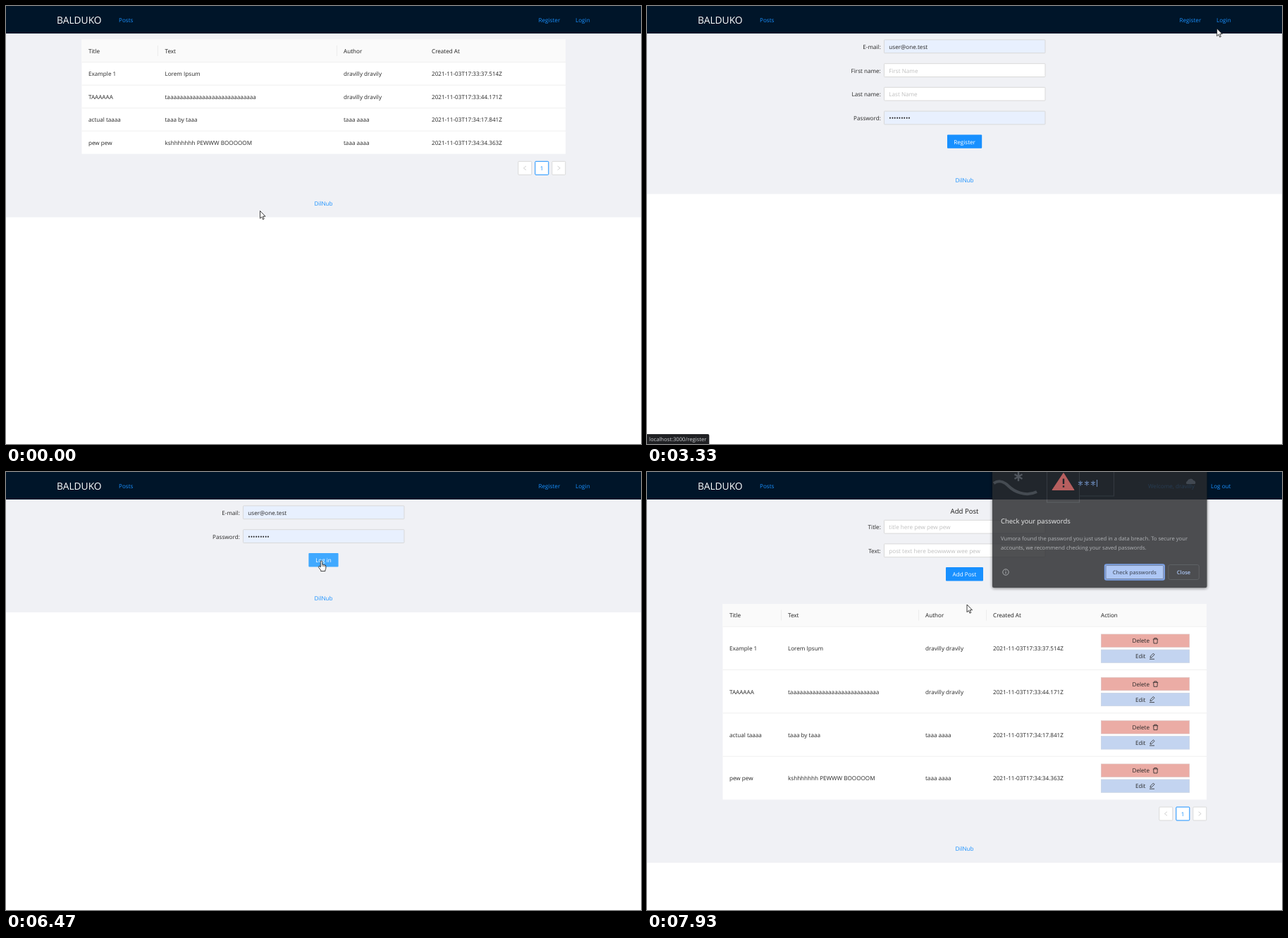
An HTML page for the animation above (8 s loop, 901 by 621 pixels).

```html
<!DOCTYPE html>
<html lang="en">
<head>
<meta charset="utf-8">
<title>Posts app walkthrough</title>
<style>
  html, body { margin: 0; width: 100%; height: 100%; overflow: hidden; background: #fff; }
  svg { display: block; width: 100vw; height: 100vh; }
  text { font: 8.15px "Open Sans", "Noto Sans", sans-serif; fill: #262626; white-space: pre; text-rendering: geometricPrecision; }
  .link { fill: #1890ff; }
  .hint { fill: #bfbfbf; }
  .white { fill: #fff; }
</style>
</head>
<body>
<svg id="stage" viewBox="0 0 901 621"></svg>
<script>
const LOOP = 8000, STEP = 200 / 3;
const BLUE = [24, 144, 255], HOVER = [64, 169, 255], PRESSED = [9, 109, 217];

// Markup helpers; text is placed by the middle of its capitals.
const label = (x, cy, str, attrs = '') => `<text x="${x}" y="${cy + 3}" ${attrs}>${str}</text>`;
const rect = (x, y, w, h, fill, attrs = '') =>
  `<rect x="${x}" y="${y}" width="${w}" height="${h}" fill="${fill}" ${attrs}/>`;
const path = (d, stroke, width = 1, fill = 'none') =>
  `<path d="${d}" stroke="${stroke}" stroke-width="${width}" fill="${fill}"/>`;
const group = (id, body, attrs = '') => `<g id="${id}" ${attrs}>${body}</g>`;
const MID = 'text-anchor="middle"', END = 'text-anchor="end"';

const posts = [
  ['Example 1', 'Lorem Ipsum', 'dravilly dravily', '2021-11-03T17:33:37.514Z'],
  ['TAAAAAA', 't' + 'a'.repeat(28), 'dravilly dravily', '2021-11-03T17:33:44.171Z'],
  ['actual taaaa', 'taaa by taaa', 'taaa aaaa', '2021-11-03T17:34:17.841Z'],
  ['pew pew', 'kshhhhhhh PEWWW BOOOOOM', 'taaa aaaa', '2021-11-03T17:34:34.363Z']
];

function backdrop(height) {
  return rect(0, 39, 901, height - 39, '#f0f1f5') +
    label(450.5, height - 19.8, 'DilNub', `class="link" ${MID}`);
}

function input(id, y, name, value, filled, dots) {
  const style = dots ? 'style="font-size:9px"' : filled ? '' : 'class="hint"';
  return label(331.8, y + 10, name + ':', END) +
    rect(336.5, y, 228.5, 18.8, filled ? '#e8f0fe' : '#fff', `id="${id}" stroke="#d9d9d9" rx=".8"`) +
    label(343.3, y + 10, value, style);
}

function button(id, x, y, w, str) {
  return rect(x, y, w, 19.4, '#1890ff', `id="${id}" rx="1"`) +
    label(x + w / 2, y + 10.2, str, `class="white" ${MID}`);
}

function pager(y) {
  const box = (x, color) => rect(x, y, 19, 19, '#fff', `stroke="${color}" rx="1"`);
  return box(726.8, '#d9d9d9') + box(750.8, '#1890ff') + box(774.8, '#d9d9d9') +
    path(`M738 ${y + 6.7}l-3.6 2.8 3.6 2.8M782.6 ${y + 6.7}l3.6 2.8-3.6 2.8`, '#c4c4c4', .8) +
    label(760.2, y + 10, '1', `class="link" ${MID}`);
}

function actions(cy) {
  const top = cy - 20.3;
  return rect(644.3, top, 125.4, 18.5, '#ebaca5', 'stroke="#dcc5c3" stroke-width=".6"') +
    rect(644.3, top + 22, 125.4, 18.5, '#c3d4f0', 'stroke="#c9d2df" stroke-width=".6"') +
    label(688.5, cy - 11, 'Delete') + label(693, cy + 11.2, 'Edit') +
    path(`M717.8 ${cy - 13.2}h7.4M719.8 ${cy - 13.2}v-1.5h3.4v1.5M718.7 ${cy - 13}l.3 5.7h5l.3-5.7`, '#262626', .8) +
    path(`M713 ${cy + 15}h7M714 ${cy + 13}l.4-2.1 4-4 1.7 1.7-4 4z`, '#262626', .8);
}

function table(top, bottom, cols, dividers, withActions) {
  const head = top + 32.2, rowH = (bottom - head) / posts.length;
  let out = rect(107.5, top, 686.5, bottom - top, '#fff') + rect(107.5, top, 686.5, 32, '#fafafa');
  ['Title', 'Text', 'Author', 'Created At', 'Action'].slice(0, cols.length)
    .forEach((name, i) => out += label(cols[i], top + 16.4, name, 'style="fill:#1c1c1c"'));
  dividers.forEach(x => out += path(`M${x} ${top + 8.5}v15`, '#ececec'));
  posts.forEach((post, r) => {
    const y = head + rowH * r, cy = y + rowH / 2 + .4;
    out += path(`M107.5 ${y}h686.5`, '#efefef');
    post.forEach((cell, c) => out += label(cols[c], cy, cell));
    if (withActions) out += actions(cy);
  });
  return out;
}

function popup() {
  const small = 'style="font-size:7.62px;fill:#a3a6a9"';
  const bold = color => `style="font-size:7.5px;font-weight:600;fill:${color}" ${MID}`;
  return rect(490, -6, 304.5, 170, '#292a2d', 'rx="2" style="filter:drop-shadow(0 1px 2px #0009)"') +
    path('M492 16c7-5 14-3 21 4s24 16 40 8', '#55585b', 4) +
    path('M527 0v13M521.5 3.2l11 6.5M532.5 3.2l-11 6.5', '#62656a', 2.4) +
    path('M567.5 0V43H613.5V34M613.5 34H662.5V0M613.5 34V0', '#3f4246', 1.2) +
    path('M591 1.5L606 25.5H575Z', '#e0706c', 1, '#e0706c') +
    path('M591 9.5v7.5M591 19.3v2.4', '#292a2d', 2.4) +
    path('M615 12.5v7M612 14.2l6 3.5M618 14.2l-6 3.5M624 12.5v7M621 14.2l6 3.5M627 14.2l-6 3.5M633 12.5v7M630 14.2l6 3.5M636 14.2l-6 3.5M638.5 11v10', '#7f9fd4', 1.2) +
    path('M765.5 17a3 3 0 0 1 1-4a5 5 0 0 1 9-1a3 3 0 0 1 2 5z', 'none', 0, '#50545a') +
    label(502, 69.5, 'Check your passwords', 'style="font-size:9.46px;fill:#eceded"') +
    label(502, 93.8, 'Vumora found the password you just used in a data breach. To secure your', small) +
    label(502, 107.4, 'accounts, we recommend checking your saved passwords.', small) +
    '<circle cx="509" cy="142" r="4.2" fill="none" stroke="#a3a6a9" stroke-width=".9"/>' +
    path('M509 141.3v3M509 139.3v1', '#a3a6a9', 1) +
    rect(649.6, 131, 84.6, 22, '#a0bff5', 'rx="2.5" stroke="#5d8ee6" stroke-width="1.6"') +
    rect(651, 132.4, 81.8, 19.2, 'none', 'rx="1.5" stroke="#3a4662" stroke-width=".7"') +
    label(691.8, 142, 'Check passwords', bold('#2c3850')) +
    rect(739.8, 131.5, 43.5, 21, 'none', 'rx="2.5" stroke="#46494d" stroke-width=".8"') +
    label(761.5, 142, 'Close', bold('#9dbdf5'));
}

const navLink = (id, x, str) => label(x, 19.7, str, `id="${id}" class="link"`);
const arrow = 'M0 0V10.7L2.4 8.4 4 12.2 5.7 11.4 4.1 7.7H7.5Z';
const hand = 'M-1.2 1.2Q-1.2 0 0 0T1.2 1.2V5Q2.2 4.4 3.1 5.4 4.2 5 4.8 6 6.4 5.8 6.4 7.5V10Q6.4 11.5 5.4 13V14.6H-.8V13.2L-3.8 9.4Q-4.6 8-3.5 7.6-2.6 7.3-1.2 8.8Z';

document.getElementById('stage').innerHTML =
  rect(0, 0, 901, 621, '#fff') +
  group('posts', backdrop(299.5) +
    table(47.5, 209.7, [117, 225.5, 479, 604], [215.5, 469.5], false) + pager(220.3)) +
  group('register', backdrop(266.5) +
    input('regMail', 47.9, 'E-mail', 'user@one.test', true) +
    input('regFirst', 81.7, 'First name', 'First Name') +
    input('regLast', 115.3, 'Last name', 'Last Name') +
    input('regPass', 149.1, 'Password', '•••••••••', true, true) +
    button('regSend', 426, 182.4, 49.2, 'Register')) +
  group('login', backdrop(199) +
    input('mail', 47.9, 'E-mail', 'user@one.test', true) +
    input('pass', 81.7, 'Password', '•••••••••', true, true) +
    rect(429, 114.6, 43, 20.4, 'none', 'id="wave" stroke="#1890ff" rx="1.5"') +
    button('send', 429.4, 115, 42.2, 'Log in')) +
  group('admin', backdrop(554) +
    label(450.5, 55.5, 'Add Post', `style="font-size:9.6px;fill:#1c1c1c" ${MID}`) +
    input('title', 68.3, 'Title', 'title here pew pew pew') +
    input('body', 101.9, 'Text', 'post text here beowwww wee pew') +
    button('add', 424, 135.1, 53, 'Add Post') +
    table(187, 464.5, [117, 200, 395, 491, 644], [190.5, 385.5, 481.5], true) + pager(475)) +
  rect(0, 0, 901, 39, '#001529') +
  label(72, 21.5, 'BALDUKO', 'style="font-size:13.8px;fill:#fff"') +
  navLink('navPosts', 160, 'Posts') +
  group('guest', navLink('navRegister', 755.5, 'Register') + navLink('navLogin', 808, 'Login')) +
  group('member', navLink('navWelcome', 711, 'Welcome, dravilly') + navLink('navOut', 800, 'Log out')) +
  group('popup', popup()) +
  group('status', '<path id="bar" fill="#202124"/>' +
    label(3, 614.2, '', 'id="url" style="font-size:7.63px;fill:#cfd1d4"')) +
  group('cursor',
    group('arrow', path(arrow, '#111', .8, '#fff')) +
    group('hand', path(hand, '#111', .8, '#fff') + path('M1.2 5v3M3.1 5.6v2.6M4.8 6.2v2.2', '#111', .6)) +
    group('beam', path('M-2.5-5.2H-.6L0-4.7 .6-5.2H2.5M0-4.7V4.7M-2.5 5.2H-.6L0 4.7 .6 5.2H2.5', '#222', 1)));

const el = {};
document.querySelectorAll('[id]').forEach(node => el[node.id] = node);

// [time, ...values] tracks, linear between keys
const cursorTrack = [
  [0, 360.5, 290.5], [470, 683, 190], [870, 152, 84], [1300, 560, 70], [1730, 789, 38],
  [1930, 784, 30], [2070, 779.5, 25.5], [2470, 779, 27], [2670, 779, 27], [3000, 790, 36],
  [3330, 808.5, 32], [3530, 818, 28], [3670, 818, 18.5], [4270, 818, 18.5], [4470, 792, 40],
  [4800, 600, 66], [5130, 450, 50], [5200, 435, 52], [5500, 438, 90], [5800, 446, 121],
  [6000, 447.5, 126], [7330, 447.5, 126], [7470, 452, 140], [7800, 465, 160], [7930, 454, 188]
];
const statusTrack = [[1930, 0], [2070, .41], [2270, 1], [5060, 1], [5200, .38], [5270, 0]];
const sendTrack = [[5730, ...BLUE], [6000, ...HOVER], [6500, ...HOVER], [6660, ...PRESSED],
  [6730, ...PRESSED], [7000, ...HOVER]];
const addTrack = [[7600, ...HOVER], [7730, 44, 156, 255], [7800, 32, 150, 255], [7930, ...BLUE]];
const waveTrack = [[6660, 0], [6700, .5], [7000, 0]];
const popupTrack = [[7800, 0], [7933, .82]];

function at(track, t) {
  if (t <= track[0][0]) return track[0].slice(1);
  for (let i = 1; i < track.length; i++) {
    const a = track[i - 1], b = track[i];
    if (t < b[0]) {
      const p = (t - a[0]) / (b[0] - a[0]);
      return a.slice(1).map((v, k) => v + (b[k + 1] - v) * p);
    }
  }
  return track[track.length - 1].slice(1);
}

const show = (id, on) => el[id].style.display = on ? '' : 'none';
const rgb = c => `rgb(${c.map(Math.round)})`;

function draw(time) {
  const t = Math.floor((time + 4) / STEP) * STEP;
  const page = t < 2530 ? 'posts' : t < 4390 ? 'register' : t < 7395 ? 'login' : 'admin';
  const [x, y] = at(cursorTrack, t);
  const inside = (l, top, r, b) => x >= l && x <= r && y >= top && y <= b;

  for (const id of ['posts', 'register', 'login', 'admin']) show(id, id === page);
  show('guest', page !== 'admin');
  show('member', page === 'admin');

  const onRegister = inside(755, 8, 787, 30), onLogin = inside(807, 8, 830, 30);
  el.navRegister.style.fill = onRegister ? '#40a9ff' : '';
  el.navLogin.style.fill = onLogin ? '#40a9ff' : '';

  const onMail = page === 'login' && inside(336, 47, 565, 67);
  const onPass = page === 'login' && inside(336, 81, 565, 101);
  el.mail.setAttribute('stroke', onMail ? '#40a9ff' : '#d9d9d9');
  el.pass.setAttribute('stroke', onPass ? '#40a9ff' : '#d9d9d9');

  const onButton = page === 'login' ? inside(429, 115, 472, 135)
    : page === 'admin' && inside(424, 135, 477, 155);
  el.send.setAttribute('fill', rgb(at(sendTrack, t)));
  el.add.setAttribute('fill', rgb(at(addTrack, t)));
  el.wave.setAttribute('opacity', at(waveTrack, t)[0]);

  const toLogin = t > 3460;
  el.url.textContent = 'localhost:3000/' + (toLogin ? 'login' : 'register');
  el.bar.setAttribute('d', `M0 607H${toLogin ? 77.5 : 86.3}q2 0 2 2V621H0Z`);
  el.status.setAttribute('opacity', at(statusTrack, t)[0]);
  el.popup.setAttribute('opacity', at(popupTrack, t)[0]);

  const kind = onRegister || onLogin || onButton ? 'hand' : onMail || onPass ? 'beam' : 'arrow';
  for (const id of ['arrow', 'hand', 'beam']) show(id, id === kind);
  el.cursor.setAttribute('transform', `translate(${x} ${y})`);
}

const start = performance.now();
function tick() {
  draw((performance.now() - start) % LOOP);
  requestAnimationFrame(tick);
}
tick();
</script>
</body>
</html>
```
